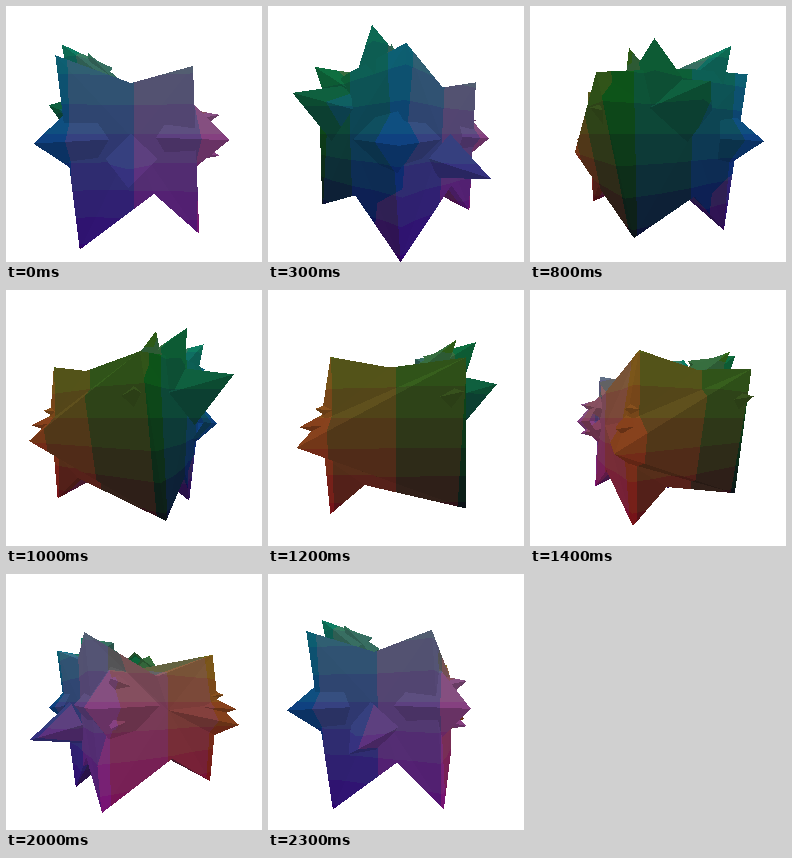
Recreate the animation shown at these times as an HTML page with a canvas. Size 256 px wide and 256 px high, loop 2.4 s.

```html
<!DOCTYPE html>
<html lang="en">
<head>
<meta charset="utf-8">
<title>Turning star solid</title>
<style>
html, body { margin: 0; width: 100%; height: 100%; overflow: hidden; background: #fff; }
canvas { display: block; width: 100vw; height: 100vh; image-rendering: pixelated; }
</style>
</head>
<body>
<canvas id="stage" width="256" height="256"></canvas>
<script>
const SIZE = 256, MID = 128, FOCAL = 214, STEPS = 24, STEP_MS = 100;
const ctx = document.getElementById('stage').getContext('2d');
const image = ctx.createImageData(SIZE, SIZE);
const depth = new Float32Array(SIZE * SIZE);

// Object space: x right, y up, z towards the viewer, camera at z = 1.
const P = {
  blue: [-.198, -.422, .219], magenta: [.229, -.351, .249],
  red: [.232, -.34, -.244], dark: [-.25, -.325, -.231],
  teal: [-.258, .258, .299], grey: [.194, .224, .296],
  yellow: [.223, .208, -.271], green: [-.215, .187, -.339],
  frontLow: [.07, -.21, .25], leftLow: [-.24, -.234, .02],
  rightLow: [.25, -.21, -.02], backLow: [.11, -.235, -.25],
  frontTop: [-.01, .176, .26], leftTop: [-.25, .235, -.03],
  rightTop: [.25, .09, .05], backTop: [.02, .165, -.3],
  brown: [.3175, -.095, -.3175], notchTop: [.26, -.01, -.26], notchLow: [.25, -.14, -.25]
};

const tris = [];
const tri = names => tris.push(names.split(' ').map(n => P[n]));

function fan(center, names) {
  const ring = names.split(' ').map(n => P[n]);
  ring.forEach((p, i) => tris.push([center, p, ring[(i + 1) % ring.length]]));
}

const sub = (a, b) => a.map((v, i) => v - b[i]);
const cross = (a, b) => [a[1] * b[2] - a[2] * b[1], a[2] * b[0] - a[0] * b[2], a[0] * b[1] - a[1] * b[0]];
const unit = a => { const l = Math.hypot(...a) || 1; return a.map(v => v / l); };

function spike(width, ...tip) {
  const dir = unit(tip);
  const u = unit(cross(dir, [0, 1, 0])), v = cross(dir, u);
  const base = [0, 1, 2, 3].map(k => {
    const c = Math.cos(k * Math.PI / 2) * width, s = Math.sin(k * Math.PI / 2) * width;
    return tip.map((t, i) => t * .6 + u[i] * c + v[i] * s);
  });
  base.forEach((p, i) => tris.push([tip, p, base[(i + 1) % 4]]));
}

fan([0, -.02, .25], 'teal frontTop grey magenta frontLow blue');
fan([-.25, 0, 0], 'green leftTop teal blue leftLow dark');
fan([.25, -.03, 0], 'grey rightTop yellow notchTop brown notchLow red rightLow magenta');
fan([0, .15, 0], 'teal frontTop grey rightTop yellow backTop green leftTop');
fan([0, -.18, 0], 'blue frontLow magenta rightLow red backLow dark leftLow');
tri('brown green dark');
tri('brown dark notchLow');
tri('notchLow dark backLow');
tri('notchLow backLow red');
tri('brown notchTop green');
tri('notchTop yellow backTop');
tri('notchTop backTop green');

spike(.15, -.316, -.03, .327);
spike(.16, .308, -.02, .308);
spike(.07, .3, -.077, .25);
spike(.07, .3, .067, .25);
spike(.08, .311, -.03, -.311);
spike(.08, .27, .03, -.285);
spike(.12, -.28, .347, .172);
spike(.08, -.183, .32, .16);
spike(.12, -.304, .288, -.188);
spike(.08, -.217, .28, -.234);
spike(.12, -.432, .145, -.084);
spike(.1, -.205, .08, -.355);
spike(.09, -.015, -.142, .44);

// Colour follows the position in the solid, in coarse bands.
const band = (v, step) => (Math.floor(v / step) + .5) * step;

function fill(t, cos, sin) {
  const view = t.map(([x, y, z]) => [x * cos + z * sin, y, z * cos - x * sin]);
  const [a, b, c] = view.map(([x, y, z]) => {
    const w = 1 / (1 - z);
    return { x: MID + FOCAL * x * w, y: MID - FOCAL * y * w, w };
  });
  const area = (b.x - a.x) * (c.y - a.y) - (b.y - a.y) * (c.x - a.x);
  if (Math.abs(area) < 1e-6) return;

  const n = unit(cross(sub(view[1], view[0]), sub(view[2], view[0])));
  const facing = -n[0] * view[0][0] - n[1] * view[0][1] + n[2] * (1 - view[0][2]);
  const light = .97 + .2 * n[1] * Math.sign(facing);

  const clip = v => Math.max(0, Math.min(SIZE - 1, v));
  const x0 = clip(Math.floor(Math.min(a.x, b.x, c.x))), x1 = clip(Math.ceil(Math.max(a.x, b.x, c.x)));
  const y0 = clip(Math.floor(Math.min(a.y, b.y, c.y))), y1 = clip(Math.ceil(Math.max(a.y, b.y, c.y)));
  for (let py = y0; py <= y1; py++) {
    for (let px = x0; px <= x1; px++) {
      const x = px + .5, y = py + .5;
      const kb = ((x - a.x) * (c.y - a.y) - (y - a.y) * (c.x - a.x)) / area;
      const kc = ((b.x - a.x) * (y - a.y) - (b.y - a.y) * (x - a.x)) / area;
      const ka = 1 - kb - kc;
      if (ka < 0 || kb < 0 || kc < 0) continue;
      const wa = ka * a.w, wb = kb * b.w, wc = kc * c.w, w = wa + wb + wc;
      const at = py * SIZE + px;
      if (w <= depth[at]) continue;
      depth[at] = w;
      const pos = i => (t[0][i] * wa + t[1][i] * wb + t[2][i] * wc) / w;
      image.data[at * 4] = light * (68 + 165 * band(pos(0), .22));
      image.data[at * 4 + 1] = light * (66 + 130 * band(pos(1), .1));
      image.data[at * 4 + 2] = light * (72 + 140 * band(pos(2), .22));
    }
  }
}

function draw(step) {
  const turn = step / STEPS * Math.PI * 2;
  image.data.fill(255);
  depth.fill(0);
  for (const t of tris) fill(t, Math.cos(turn), Math.sin(turn));
  ctx.putImageData(image, 0, 0);
}

const start = performance.now();
let shown = -1;
function tick() {
  const step = Math.floor((performance.now() - start) / STEP_MS) % STEPS;
  if (step !== shown) draw(shown = step);
  requestAnimationFrame(tick);
}
tick();
</script>
</body>
</html>
```
